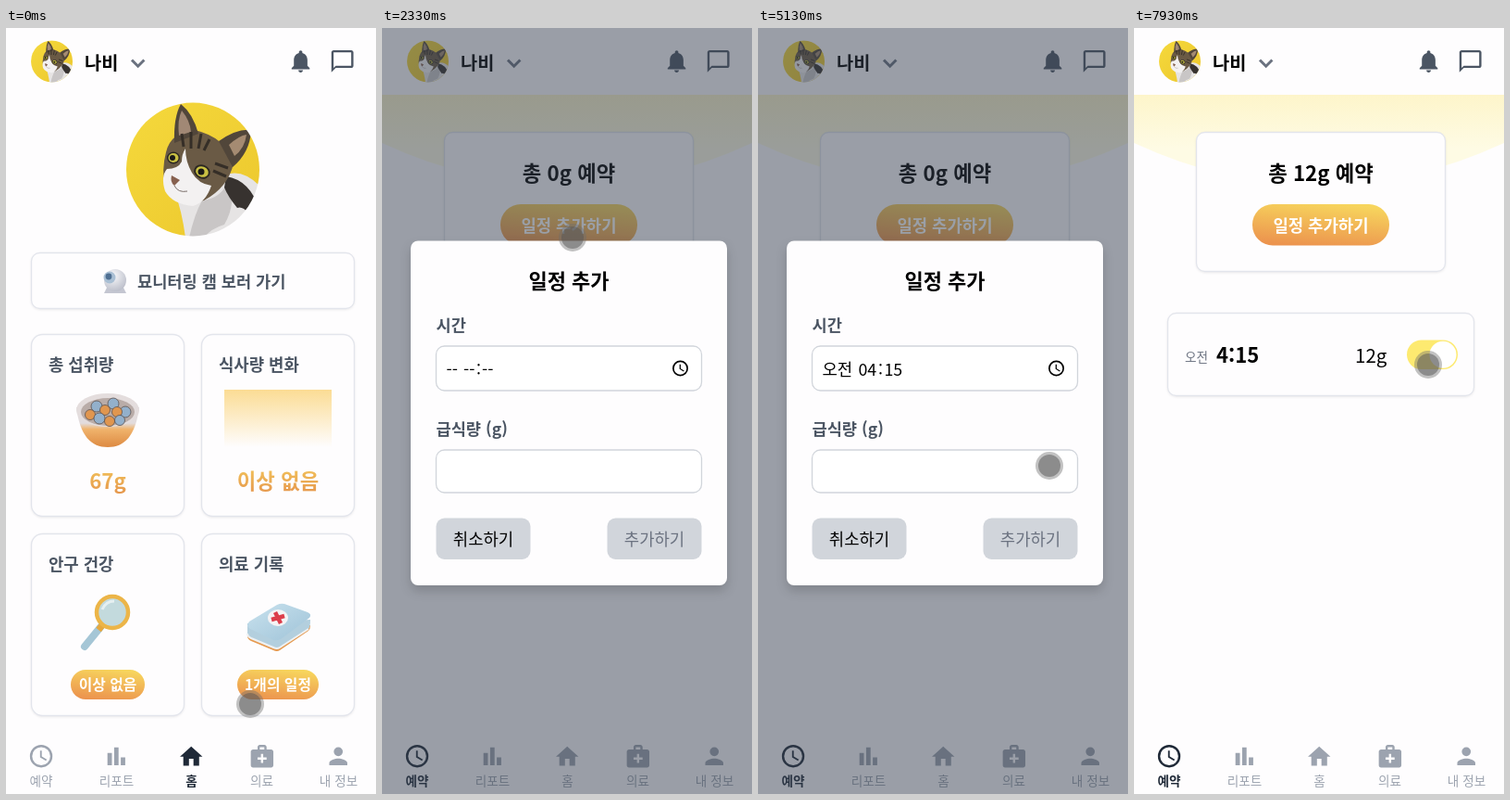
Recreate the animation shown at these times as an HTML page. Size 400 by 826 pixels, loop 8000 ms.

```html
<!DOCTYPE html>
<html lang="ko">
<head>
<meta charset="utf-8">
<title>급식 예약</title>
<style>
html, body { margin: 0; width: 100%; height: 100%; overflow: hidden; background: #fefdfe; }
svg.stage { display: block; width: 100vw; height: 100vh; }
text { font-family: "Noto Sans CJK KR", "Noto Sans CJK", "Noto Sans", sans-serif; white-space: pre; }
.b { font-weight: 700; }
.mid { text-anchor: middle; }
.s14 { font-size: 13.6px; } .s16 { font-size: 15.8px; } .s18 { font-size: 17.8px; } .s22 { font-size: 22.3px; }
.gray { fill: #4b5563; }
.card { fill: #fefdfe; stroke: #e3e5ec; stroke-width: 1.3; filter: drop-shadow(0 1px 1px rgba(0,0,0,.07)); }
.field { fill: #fff; stroke: #d1d5db; stroke-width: 1.3; }

/* hard state changes */
.home, .reserve, .late, .early, .modal, .popup, .picker, .blank, .filled, .focus, .one, .twelve, .ready, .empty, .listed, .idle, .active, .lift {
  animation: 8s step-end infinite;
}
.home { animation-name: home; }        @keyframes home { 0% { opacity: 1 } 12.5%, 100% { opacity: 0 } }
.reserve { animation-name: reserve; }  @keyframes reserve { 0% { opacity: 0 } 12.5%, 100% { opacity: 1 } }
.late { animation-name: late; }        @keyframes late { 0% { opacity: 1 } 12.5% { opacity: 0 } 14.1%, 100% { opacity: 1 } }
.lift { animation-name: lift; }        @keyframes lift { 0% { transform: none } 12.5% { transform: translateY(-9px) } 14.1%, 100% { transform: none } }
.early { animation-name: early; }      @keyframes early { 0% { transform: none } 12.5% { transform: translateY(-18px) } 14.1%, 100% { transform: none } }
.modal { animation-name: modal; }      @keyframes modal { 0% { opacity: 0 } 28.3% { opacity: 1 } 86.2%, 100% { opacity: 0 } }
.popup { animation-name: popup; }      @keyframes popup { 0% { opacity: 0 } 39.2% { opacity: 1 } 61%, 100% { opacity: 0 } }
.picker { animation-name: picker; }    @keyframes picker { 0% { opacity: 0 } 41% { opacity: 1 } 61%, 100% { opacity: 0 } }
.blank { animation-name: blank; }      @keyframes blank { 0% { opacity: 1 } 49.2%, 100% { opacity: 0 } }
.filled { animation-name: filled; }    @keyframes filled { 0% { opacity: 0 } 49.2%, 100% { opacity: 1 } }
.focus { animation-name: focus; }      @keyframes focus { 0% { opacity: 0 } 65.7%, 100% { opacity: 1 } }
.one { animation-name: one; }          @keyframes one { 0% { opacity: 0 } 68.2%, 100% { opacity: 1 } }
.twelve { animation-name: twelve; }    @keyframes twelve { 0% { opacity: 0 } 71.5%, 100% { opacity: 1 } }
.ready { animation-name: ready; }      @keyframes ready { 0% { opacity: 0 } 68.2%, 100% { opacity: 1 } }
.empty { animation-name: empty; }      @keyframes empty { 0% { opacity: 1 } 86.2%, 100% { opacity: 0 } }
.listed { animation-name: listed; }    @keyframes listed { 0% { opacity: 0 } 86.2%, 100% { opacity: 1 } }
.nav { fill: #9ca3af; }
.active { animation-name: active; }
@keyframes active { 0% { fill: #9ca3af; font-weight: 400 } 12.5%, 100% { fill: #1f2937; font-weight: 700 } }
.idle { animation-name: idle; }
@keyframes idle { 0% { fill: #1f2937; font-weight: 700 } 12.5%, 100% { fill: #9ca3af; font-weight: 400 } }

.hours { animation: hours 8s ease-out infinite; }
@keyframes hours { 0%, 49.2% { transform: none } 52%, 100% { transform: translateY(-144px) } }

.cursor { animation: cursor 8s ease-in-out infinite; }
@keyframes cursor {
  0%, .8% { transform: translate(264px,729px) }
  10%, 20.5% { transform: translate(41px,809px) }
  27.5%, 31% { transform: translate(206px,226px) }
  39%, 41.8% { transform: translate(333px,367px) }
  48.2%, 53.2% { transform: translate(171px,560px) }
  60.5%, 64.2% { transform: translate(315px,472px) }
  68.5%, 76.5% { transform: translate(292px,483px) }
  82.5%, 87.2% { transform: translate(275px,555px) }
  97.5% { transform: translate(317px,367px) }
  99%, 100% { transform: translate(318px,363px) }
}
</style>
</head>
<body>
<svg class="stage" viewBox="0 0 400 826" preserveAspectRatio="none">
<defs>
  <linearGradient id="warm" x1=".65" y1="0" x2=".35" y2="1"><stop stop-color="#f7d55d"/><stop offset="1" stop-color="#ec944e"/></linearGradient>
  <linearGradient id="ink" x1="0" y1="0" x2="0" y2="1"><stop stop-color="#f3c75c"/><stop offset="1" stop-color="#e5954c"/></linearGradient>
  <linearGradient id="fade" x1="0" y1="0" x2="0" y2="1"><stop stop-color="#fbdc94"/><stop offset="1" stop-color="#fefdfe"/></linearGradient>
  <linearGradient id="sun" x1="0" y1="0" x2="0" y2="1"><stop stop-color="#fdf3c2"/><stop offset=".65" stop-color="#fefbe4"/></linearGradient>
  <linearGradient id="wall" x1="0" y1="0" x2="1" y2="1"><stop stop-color="#f5d93c"/><stop offset="1" stop-color="#ecc72d"/></linearGradient>
  <linearGradient id="bowl" x1="0" y1="0" x2="0" y2="1"><stop offset=".4" stop-color="#e2dcdd"/><stop offset=".55" stop-color="#f0b36c"/><stop offset="1" stop-color="#dd8a42"/></linearGradient>
  <linearGradient id="kit" x1="0" y1="0" x2="1" y2="1"><stop stop-color="#c9e2ee"/><stop offset="1" stop-color="#9fc3d8"/></linearGradient>
  <radialGradient id="fur" cx=".4" cy=".3" r=".8"><stop stop-color="#f0b45f"/><stop offset="1" stop-color="#d9943f"/></radialGradient>
  <radialGradient id="ball" cx=".4" cy=".3" r=".75"><stop stop-color="#fafafc"/><stop offset="1" stop-color="#b9bcc8"/></radialGradient>
  <clipPath id="round"><circle cx="202" cy="152.5" r="72"/></clipPath>
  <clipPath id="sheet"><rect x="58" y="391" width="224" height="339" rx="5"/></clipPath>

  <g id="cat" clip-path="url(#round)">
    <path d="M130 80h144v145H130z" fill="url(#wall)"/>
    <path d="M182 176Q190 196 194 226H274V170Q256 152 238 158Z" fill="#e6e4e4"/>
    <path d="M212 186Q232 184 240 166Q250 188 236 212Q222 216 214 226H198Q204 200 212 186Z" fill="#c9c6c6"/>
    <path d="M238 160Q264 164 274 196L262 200Q256 192 250 194Q240 182 236 172Z" fill="#37322f"/>
    <path d="M173 134Q178 112 204 110Q238 118 246 146Q240 172 214 186Q190 190 172 172Q168 152 173 134Z" fill="#6a5a45"/>
    <path d="M182 124Q181 96 189 82Q202 92 208 114Z" fill="#51463a"/>
    <path d="M187 116Q185 99 190 89Q199 100 200 112Z" fill="#a18875"/>
    <path d="M230 122Q250 108 265 110Q264 134 245 150Z" fill="#51463a"/>
    <path d="M241 126Q252 116 260 115Q258 130 247 138Z" fill="#a58b72"/>
    <path d="M194 130Q194 144 201 156Q208 168 222 170Q216 188 202 192Q180 190 172 176Q167 160 174 152Q186 152 190 144Q190 136 194 130Z" fill="#f3f1f1"/>
    <path d="M190 114l2 14M200 112l0 18M211 114l-3 16M220 120l-6 12M226 146l14 5M224 154l14 6" stroke="#352e27" stroke-width="3" fill="none"/>
    <ellipse cx="181" cy="140" rx="7" ry="6.5" fill="#2c2822"/><ellipse cx="181" cy="140" rx="5.5" ry="5" fill="#c9c043"/><circle cx="180" cy="140" r="3" fill="#1b1a18"/>
    <ellipse cx="212" cy="155" rx="9" ry="7.5" fill="#2c2822" transform="rotate(20 212 155)"/><ellipse cx="212" cy="155" rx="7" ry="5.6" fill="#c9c043" transform="rotate(20 212 155)"/><circle cx="211" cy="155" r="3.5" fill="#1b1a18"/>
    <path d="M179 159l9 5-6 6q-5-4-3-11z" fill="#86604e"/>
    <path d="M182 170q4 8 14 6" stroke="#7b706c" fill="none"/>
  </g>
  <path id="clock" d="M12 2a10 10 0 1 0 0 20a10 10 0 1 0 0-20zm0 18a8 8 0 1 1 0-16a8 8 0 1 1 0 16zm.5-13H11v6l5.2 3.2.8-1.3-4.5-2.7z"/>
</defs>

<rect width="400" height="826" fill="#fefdfe"/>

<!-- home page -->
<g class="home">
  <use href="#cat"/>
  <rect class="card" x="27.5" y="242.5" width="349" height="60" rx="9"/>
  <g>
    <path d="M109 280h18l3 6h-24z" fill="#c4c6d1"/>
    <circle cx="118" cy="272" r="12" fill="url(#ball)"/>
    <circle cx="112" cy="269" r="6.5" fill="#a9bfd4"/><circle cx="111" cy="268" r="3.4" fill="#4f6f92"/>
  </g>
  <text class="b gray" x="142" y="280" font-size="17.6">묘니터링 캠 보러 가기</text>
  <rect class="card" x="27.5" y="330.5" width="165" height="196" rx="12"/>
  <rect class="card" x="211.5" y="330.5" width="165" height="196" rx="12"/>
  <rect class="card" x="27.5" y="545.5" width="165" height="196" rx="12"/>
  <rect class="card" x="211.5" y="545.5" width="165" height="196" rx="12"/>
  <g class="b s18 gray">
    <text x="46" y="370">총 섭취량</text><text x="230" y="370">식사량 변화</text>
    <text x="46" y="585">안구 건강</text><text x="230" y="585">의료 기록</text>
  </g>
  <rect x="236" y="390" width="116" height="62" fill="url(#fade)"/>
  <g class="b mid s22" fill="url(#ink)"><text x="110" y="497">67g</text><text x="294" y="497">이상 없음</text></g>

  <path d="M76 409C80 440 92 452 110 452S140 440 144 409Z" fill="url(#bowl)"/>
  <ellipse cx="110" cy="412" rx="34" ry="18" fill="#e4dddd"/>
  <ellipse cx="110" cy="414" rx="29" ry="15" fill="#b9aca8"/>
  <g stroke="#5d5351" stroke-width=".8">
    <g fill="#93b0cb"><circle cx="98" cy="408" r="6"/><circle cx="116" cy="405" r="6"/><circle cx="129" cy="414" r="6"/></g>
    <g fill="#e0964f"><circle cx="107" cy="412" r="5.5"/><circle cx="91" cy="417" r="5.5"/><circle cx="120" cy="414" r="5.5"/></g>
    <g fill="#93b0cb"><circle cx="101" cy="421" r="6"/><circle cx="123" cy="423" r="5.5"/></g>
    <circle cx="112" cy="424" r="5.5" fill="#e0964f"/>
  </g>

  <path d="M103 645L85 667" stroke="#a5c6d6" stroke-width="8" stroke-linecap="round"/>
  <path d="M105 643l-5 6" stroke="#e6a83e" stroke-width="7"/>
  <circle cx="115" cy="630" r="17" fill="#c3dadd" stroke="#ecb548" stroke-width="4.5"/>
  <path d="M104 627q4-9 13-9" stroke="#e6f0f1" stroke-width="3" fill="none"/>

  <path d="M261 650v6q0 3 4 5l24 10q4 2 7 0l31-21q2-2 2-6z" fill="#e69a50"/>
  <path d="M261 642v11q0 3 4 5l24 10q4 2 7 0l31-20q2-2 2-10z" fill="#b3cfde"/>
  <path d="M261 653q0 3 4 5l24 10q4 2 7 0l31-20" fill="none" stroke="#eef1f3" stroke-width="2"/>
  <path d="M263 640L293 622q4-2 8-1l25 9q5 2 2 6l-31 23q-4 2-8 1l-25-12q-5-3-1-8z" fill="url(#kit)"/>
  <ellipse cx="294" cy="636" rx="11" ry="9" fill="#f5f3f4"/>
  <path d="M287 638l14-4M291 630l6 12" stroke="#dc3e4b" stroke-width="4.5"/>

  <rect x="70" y="692" width="80" height="32" rx="16" fill="url(#warm)"/>
  <rect x="250" y="692" width="88" height="32" rx="16" fill="url(#warm)"/>
  <g class="b mid s16" fill="#fff"><text x="110" y="714">이상 없음</text><text x="294" y="714">1개의 일정</text></g>
</g>

<!-- reservation page -->
<g class="reserve">
  <path d="M0 54H400V124Q200 216 0 124Z" fill="url(#sun)"/>
  <rect class="early" y="-20" width="400" height="92" fill="#fefdfe"/>
  <rect class="card" x="67.5" y="112.5" width="269" height="150" rx="9"/>
  <text class="b mid s22 empty" x="202" y="165">총 0g 예약</text>
  <text class="b mid s22 listed" x="202" y="165">총 12g 예약</text>
  <rect x="128" y="190" width="148" height="44.5" rx="22" fill="url(#warm)"/>
  <text class="b mid s18" x="202" y="219.5" fill="#fff">일정 추가하기</text>

  <g class="empty">
    <path d="M238 424Q260 414 254 394Q247 381 227 378" fill="none" stroke="#dfa04c" stroke-width="9.5" stroke-linecap="round"/>
    <path d="M228 378l-2-1" stroke="#77726f" stroke-width="8" stroke-linecap="round"/>
    <path d="M206 420Q238 406 248 430Q253 450 251 466Q246 474 234 469L230 458Q222 468 206 480Z" fill="url(#fur)"/>
    <path d="M170 428Q190 412 226 424Q238 446 220 470Q210 486 203 503Q192 514 179 508Q176 498 182 480L176 477Q170 486 167 492Q156 499 147 490Q149 478 159 464Q156 442 170 428Z" fill="url(#fur)"/>
    <path d="M219 414Q231 410 238 419Q242 428 242 434Q230 432 222 424Z" fill="#343033"/>
    <path d="M180 438Q192 446 194 460Q193 473 184 473Q174 468 173 456Q174 444 180 438ZM166 433Q173 438 171 450Q166 460 161 456Q158 444 166 433Z" fill="#343033"/>
    <path d="M171 408Q167 386 174 382Q187 384 197 399ZM203 408Q214 396 228 402Q230 420 212 427Z" fill="#343033"/>
    <path d="M173 406Q169 389 174 386Q183 391 187 401ZM208 417Q216 404 225 405Q226 418 212 424Z" fill="#c4aaa8"/>
    <ellipse cx="194" cy="415" rx="21" ry="20.5" fill="url(#fur)"/>
    <path d="M181 389Q190 384 195 397L201 398Q212 397 208 407Q198 399 186 397Z" fill="#343033"/>
    <ellipse cx="185" cy="427" rx="11" ry="7.5" fill="#f4eee9" transform="rotate(18 185 427)"/>
    <circle cx="181" cy="411" r="1.9" fill="#222"/><circle cx="198" cy="418" r="1.9" fill="#222"/>
    <ellipse cx="182" cy="423" rx="4" ry="2.7" fill="#252326"/>
    <path d="M151 492v-4M157 495v-4M184 508v-4M191 509v-4M238 470v-4M245 470v-4" stroke="#4a3520" stroke-width="2"/>
    <text class="mid gray" x="202" y="558.5" font-size="15.6">배급 예약이 없습니다.</text>
  </g>
  <g class="listed">
    <rect class="card" x="36.5" y="307.5" width="331" height="89" rx="9"/>
    <text class="s14" x="55" y="360" fill="#6b7280">오전</text>
    <text class="b" x="89" y="361" font-size="22">4:15</text>
    <text x="239" y="361" font-size="20.5">12g</text>
    <rect x="295" y="336.5" width="55" height="31.5" rx="15.7" fill="#fdea70"/>
    <circle cx="334" cy="352.3" r="14.5" fill="#fff"/>
  </g>
</g>

<!-- header -->
<g class="late">
  <use href="#cat" transform="translate(-13.6 -11.7) scale(.3125)"/>
  <text class="b" x="85" y="44.6" font-size="19.8">나비</text>
  <path d="M136 34.5l6.7 6.7 6.7-6.7" fill="none" stroke="#6b7280" stroke-width="3"/>
</g>
<g class="lift"><g class="gray">
  <path transform="translate(303.9 21.2) scale(1.22)" d="M12 22c1.1 0 2-.9 2-2h-4c0 1.1.9 2 2 2zm6-6v-5c0-3.07-1.64-5.64-4.5-6.32V4c0-.83-.67-1.5-1.5-1.5s-1.5.67-1.5 1.5v.68C7.63 5.36 6 7.92 6 11v5l-2 2v1h16v-1z"/>
  <path transform="translate(349.4 21.6) scale(1.19)" d="M20 2H4c-1.1 0-2 .9-2 2v18l4-4h14c1.1 0 2-.9 2-2V4c0-1.1-.9-2-2-2zm0 14H6l-2 2V4h16z"/>
</g></g>

<!-- bottom navigation -->
<g class="nav mid s14">
  <g class="active"><use href="#clock" transform="translate(23.4 770.6) scale(1.22)"/><text x="38" y="817">예약</text></g>
  <path transform="translate(104.9 770.9) scale(1.2)" d="M4 9h4v11H4zM16 13h4v7h-4zM10 4h4v16h-4z"/><text x="119.5" y="817">리포트</text>
  <g class="idle"><path transform="translate(185.6 771) scale(1.22)" d="M10 20v-6h4v6h5v-8h3L12 3 2 12h3v8z"/><text x="200.5" y="817">홈</text></g>
  <path transform="translate(262.2 770.6) scale(1.22)" d="M20 6h-4V4c0-1.1-.9-2-2-2h-4c-1.1 0-2 .9-2 2v2H4c-1.1 0-2 .9-2 2v12c0 1.1.9 2 2 2h16c1.1 0 2-.9 2-2V8c0-1.1-.9-2-2-2zM10 4h4v2h-4zm6 11h-3v3h-2v-3H8v-2h3v-3h2v3h3z"/><text x="276.5" y="817">의료</text>
  <path transform="translate(344.6 770.6) scale(1.22)" d="M12 12a4 4 0 1 0 0-8a4 4 0 1 0 0 8zm0 2c-2.67 0-8 1.34-8 4v2h16v-2c0-2.66-5.33-4-8-4z"/><text x="359.5" y="817">내 정보</text>
</g>

<!-- dialog -->
<g class="modal">
  <rect width="400" height="826" fill="#374151" opacity=".5"/>
  <rect x="31" y="229.5" width="342" height="371.5" rx="8" fill="#fefdfe" style="filter:drop-shadow(0 6px 6px rgba(0,0,0,.16))"/>
  <text class="b mid" x="202" y="281" font-size="22">일정 추가</text>
  <g class="b gray" font-size="17.6"><text x="58.5" y="326.5">시간</text><text x="58.5" y="439">급식량 (g)</text></g>
  <rect class="field" x="58.5" y="343" width="287" height="48" rx="9"/>
  <rect class="field" x="58.5" y="455" width="287" height="46" rx="9"/>
  <g class="s18">
    <g class="blank"><text x="69.5" y="375">--</text><text x="88" y="375">--</text><text x="102" y="375">:</text><text x="108" y="375">--</text></g>
    <g class="filled"><text x="69.5" y="374.5">오전</text><text x="108.5" y="374.5">04</text><text x="130" y="374.5">:</text><text x="136.5" y="374.5">15</text></g>
    <use href="#clock" transform="translate(312.3 356.8) scale(.85)"/>
    <rect class="focus" x="59" y="455.5" width="286" height="45" rx="9" fill="none" stroke="#111" stroke-width="2.3"/>
    <text class="one" x="68.5" y="485.5">1</text>
    <text class="twelve" x="78.4" y="485.5">2</text>
    <rect x="58.5" y="528.5" width="102" height="44.5" rx="9" fill="#d1d5db"/>
    <rect x="243.5" y="528.5" width="102" height="44.5" rx="9" fill="#d1d5db"/>
    <text class="mid" x="109.5" y="558">취소하기</text>
    <text class="mid" x="294.5" y="558" fill="#6b7280">추가하기</text>
    <g class="ready"><rect x="243.5" y="528.5" width="102" height="44.5" rx="9" fill="#fde766"/><text class="mid" x="294.5" y="558">추가하기</text></g>
  </g>
</g>

<!-- time picker -->
<g class="popup">
  <foreignObject x="0" y="330" width="400" height="496">
    <div xmlns="http://www.w3.org/1999/xhtml" style="position:absolute;left:57px;top:60px;width:224px;height:339px;border:1.5px solid rgba(90,92,98,.6);border-radius:6px;box-shadow:0 8px 28px rgba(0,0,0,.24),0 2px 5px rgba(0,0,0,.18)"></div>
  </foreignObject>
</g>
<g class="picker" clip-path="url(#sheet)">
  <path d="M58 391h224v339H58z" fill="#fff"/>
  <path d="M61 395h70v46H61zM135 395h70v46h-70zM209 395h70v46h-70z" fill="#1a73e8"/>
  <g class="mid s16" id="columns"></g>
</g>

<g class="cursor">
  <circle r="15" fill="#6e6e6e" opacity=".42"/>
  <circle r="12" fill="#555" opacity=".5"/>
</g>
</svg>
<script>
const columns = document.getElementById("columns");
const pad = n => String(n).padStart(2, "0");
const range = (from, count) => Array.from({ length: count }, (_, i) => pad(from + i));

function addColumn(x, labels, selected, name = "") {
  const cells = labels.map((label, i) =>
    `<text x="${x}" y="${424 + 48 * i}" fill="${i === selected ? "#fff" : "#222"}">${label}</text>`);
  columns.insertAdjacentHTML("beforeend", `<g class="${name}">${cells.join("")}</g>`);
}
addColumn(96, ["오전", "오후"], 0);
addColumn(170, range(1, 10), -1, "hours");
addColumn(244, range(15, 7), 0);
</script>
</body>
</html>
```
